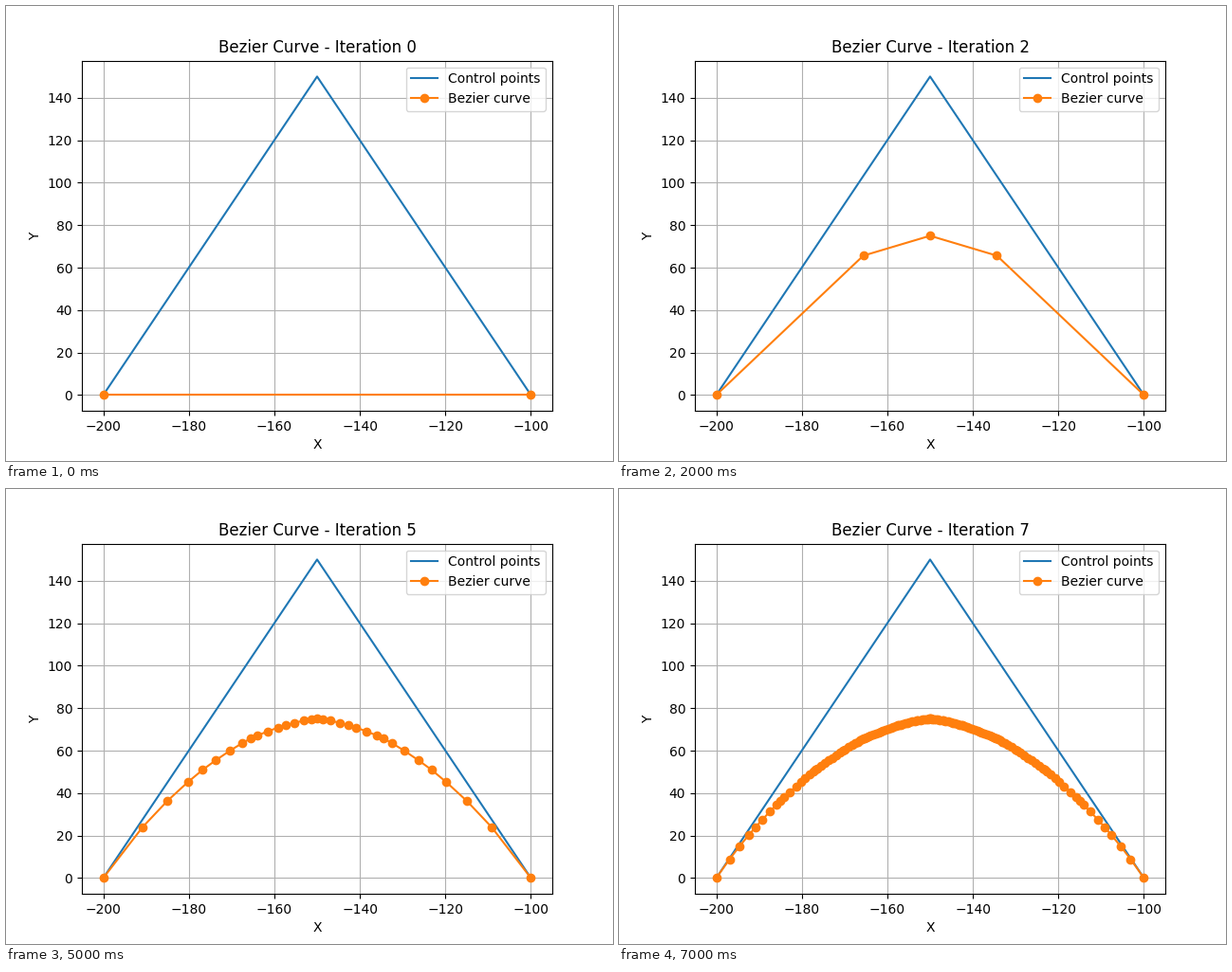
A matplotlib script for the animation above (8000 ms loop, 640x480 px).

```python
import numpy as np
import matplotlib.pyplot as plt
from matplotlib.animation import FuncAnimation

CONTROL = np.array([(-200, 0), (-150, 150), (-100, 0)], dtype=float)
STEPS = 8


def split(points):
    """Halve a curve by repeated midpoints; the shared point is kept twice."""
    left, right = [points[0]], [points[-1]]
    while len(points) > 1:
        points = (points[:-1] + points[1:]) / 2
        left.append(points[0])
        right.append(points[-1])
    middle = points[0]
    return np.array(left + [middle]), np.array([middle] + right[::-1])


def subdivide(points, depth):
    """Return the curve's points after the given number of halvings."""
    if depth == 0:
        return [points[0], points[-1]]
    left, right = split(points)
    return subdivide(left, depth - 1) + subdivide(right, depth - 1)[1:]


fig, ax = plt.subplots(figsize=(6.4, 4.8), dpi=100)
ax.plot(*CONTROL.T, color="tab:blue", label="Control points")
curve, = ax.plot([], [], "o-", color="tab:orange", label="Bezier curve")
ax.set_xlim(-205, -95)
ax.set_ylim(-7.5, 157.5)
ax.set_xlabel("X")
ax.set_ylabel("Y")
ax.grid(True)
ax.legend(loc="upper right")
title = ax.set_title("Bezier Curve - Iteration 0")


def update(step):
    curve.set_data(*np.array(subdivide(CONTROL, step)).T)
    title.set_text(f"Bezier Curve - Iteration {step}")
    return curve, title


anim = FuncAnimation(fig, update, frames=STEPS, interval=1000, repeat=True)
plt.show()
```
